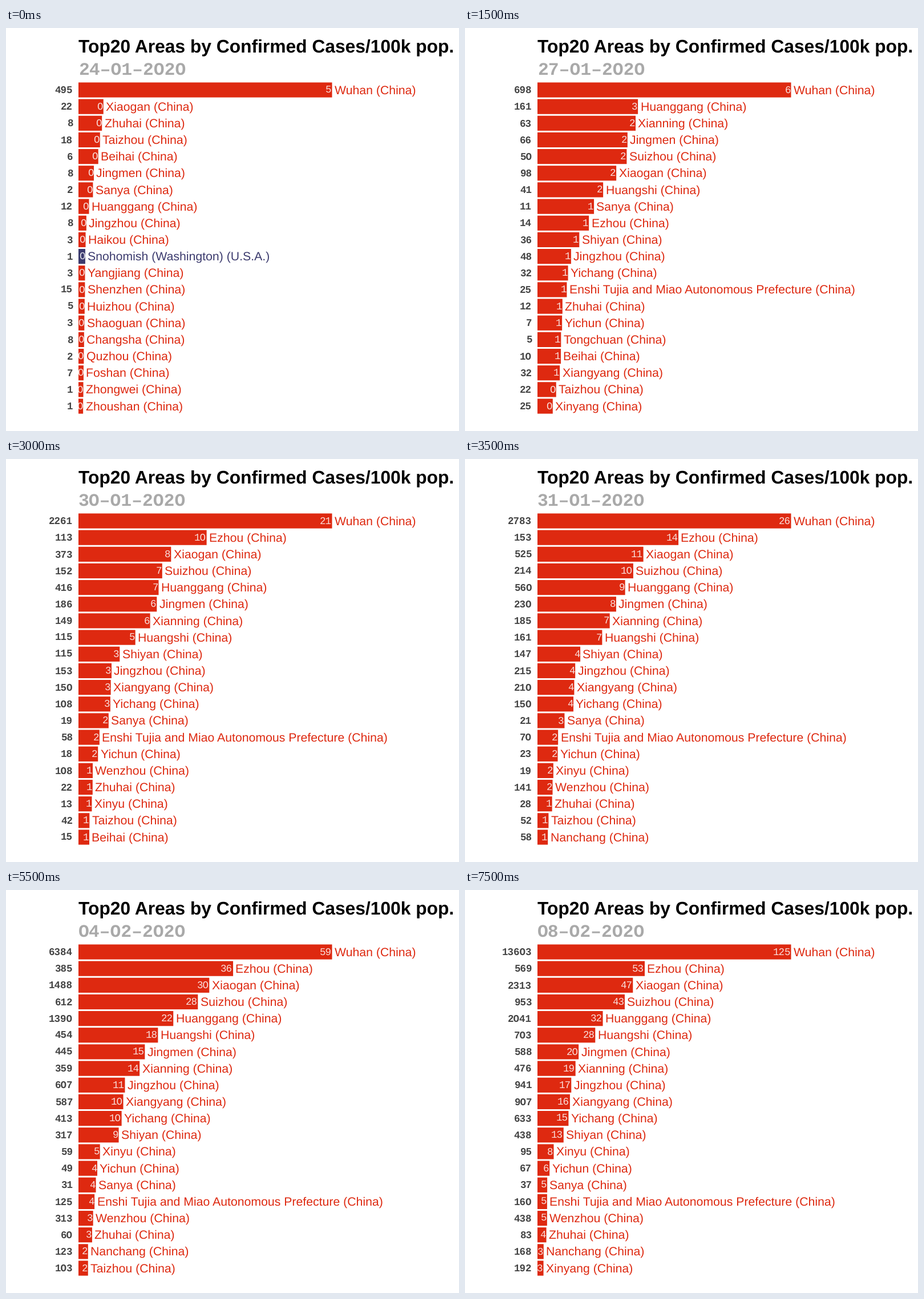
Recreate the animation shown at these times as a matplotlib script. Size 794 px wide and 706 px high, loop 8 s.

```python
import numpy as np
import matplotlib.pyplot as plt
from matplotlib.animation import FuncAnimation

plt.rcParams["text.hinting"] = "none"

W, H, DPI = 794, 706, 64
DAYS, ROWS = 16, 20
LEFT, FULL = 127, 444.5           # bar origin and longest bar
TOP, PITCH, THICK = 108.5, 29.16, 26.2
RED, BLUE, GREY = "#de2910", "#3c3b6e", "#a9a9a9"

KNOTS = [0, 2, 4, 15]             # days between which growth is eased
t = np.arange(DAYS)

# population in 100k, then cases on days 2, 4 and 15
AREAS = {
    "Ezhou": (10.77, 3, 57, 569),
    "Xiaogan": (49.2, 55, 173, 2313),
    "Suizhou": (22.17, 36, 70, 953),
    "Huanggang": (63.4, 122, 213, 2041),
    "Huangshi": (24.7, 31, 53, 703),
    "Jingmen": (29, 38, 114, 588),
    "Xianning": (25.4, 43, 91, 476),
    "Jingzhou": (56.5, 33, 71, 941),
    "Xiangyang": (56.7, 14, 70, 907),
    "Yichang": (41.4, 20, 51, 633),
    "Shiyan": (34.06, 20, 65, 438),
    "Xinyu": (11.87, 2, 5, 95),
    "Yichun": (11.26, 5, 10, 67),
    "Sanya": (7.7, 8, 14, 37),
    "Enshi Tujia and Miao Autonomous Prefecture": (33.7, 17, 38, 160),
    "Wenzhou": (92.5, 18, 60, 438),
    "Zhuhai": (19, 12, 12, 83),
    "Nanchang": (55.46, 10, 26, 168),
    "Xinyang": (64.7, 22, 28, 192),
    "Taizhou": (46.6, 20, 25, 137),
    "Beihai": (16.9, 9, 11, 30),
    "Tongling": (16.4, 1, 9),
    "Tongchuan": (8.4, 5),
    "Yangjiang": (25.6, 8),
    "Danzhou": (10, 3),
}
# cases on the first day; everyone else starts just below the chart
FIRST = {"Xiaogan": 22, "Zhuhai": 8, "Taizhou": 18, "Beihai": 6, "Jingmen": 8,
         "Sanya": 2, "Huanggang": 12, "Jingzhou": 8, "Yangjiang": 3}
# areas seen only at the start, in falling order of rate
EARLY = {"Haikou": 3, "Snohomish": 1, "Shenzhen": 15, "Huizhou": 5, "Shaoguan": 3,
         "Changsha": 8, "Quzhou": 2, "Foshan": 7, "Zhongwei": 1, "Zhoushan": 1}


def grow(when, days, counts):
    """Exponential growth through the given counts, then flat."""
    logs = np.interp(when, days[:len(counts)], np.log1p(counts))
    return np.rint(np.expm1(logs)).astype(int)


late = np.clip((t - KNOTS[2]) / (KNOTS[3] - KNOTS[2]), 0, 1)
slowing = np.where(late > 0, KNOTS[2] + (KNOTS[3] - KNOTS[2]) * (1 - (1 - late) ** 1.75), t)

wuhan = grow(t, [0, 2, 3, 4, 6, 11, 15], [495, 618, 698, 1590, 2261, 6384, 13603])
series = {"Wuhan": (108.9, wuhan)}
for area, (pop, *counts) in AREAS.items():
    first = FIRST.get(area, int(0.08 * pop))
    series[area] = (pop, grow(slowing, KNOTS, [first, *counts]))
for i, (area, count) in enumerate(EARLY.items()):
    series[area] = (count / (0.128 * 0.953 ** i), np.full(DAYS, count))


def ranking(day):
    rows = [(cases[day] / pop, cases[day], area)
            for area, (pop, cases) in series.items()]
    return sorted(rows, reverse=True)[:ROWS]


fig = plt.figure(figsize=(W / DPI, H / DPI), dpi=DPI, facecolor="white")
ax = fig.add_axes([0, 0, 1, 1])
ax.set_axis_off()


def write(x, y, px, color, family="Liberation Mono", **kw):
    return ax.text(x, y, "", fontsize=px * 72 / DPI, color=color,
                   family=family, va="baseline", **kw)


def plain(value):
    """Monospaced digits with an undotted zero."""
    return str(value).replace("0", "O")


centers = TOP + PITCH * np.arange(ROWS)
bars = ax.barh(centers, np.ones(ROWS), height=THICK, left=LEFT,
               linewidth=0, snap=False)
totals = [write(117.2, y + 5.5, 17.5, "#444444", ha="right", weight="bold")
          for y in centers]
rates = [write(LEFT, y + 5, 17.5, "white", ha="right", alpha=0.85) for y in centers]
names = [write(LEFT, y + 6.7, 21.2, RED, "Liberation Sans") for y in centers]
title = write(LEFT, 42.5, 31.75, "black", "Liberation Sans", weight="bold")
title.set_text("Top20 Areas by Confirmed Cases/100k pop.")
date = write(LEFT, 82.7, 31.4, GREY, weight="bold")
ax.set_xlim(0, W)
ax.set_ylim(H, 0)


def draw(day):
    today = str(np.datetime64("2020-01-24") + day)
    date.set_text(plain("\u2013".join(reversed(today.split("-")))))
    rows = ranking(day)
    top = rows[0][0]
    for i, (rate, cases, area) in enumerate(rows):
        abroad = area == "Snohomish"
        color = BLUE if abroad else RED
        end = LEFT + FULL * rate / top
        bars[i].set_width(end - LEFT)
        bars[i].set_facecolor(color)
        totals[i].set_text(plain(cases))
        rates[i].set_text(plain(round(rate)))
        rates[i].set_x(end - 0.7)
        names[i].set_text(area + (" (Washington) (U.S.A.)" if abroad else " (China)"))
        names[i].set_x(end + 4.4)
        names[i].set_color(color)
    return [date, *bars, *totals, *rates, *names]


anim = FuncAnimation(fig, draw, frames=DAYS, interval=500,
                     repeat=True, repeat_delay=0, blit=False)
plt.show()
```
